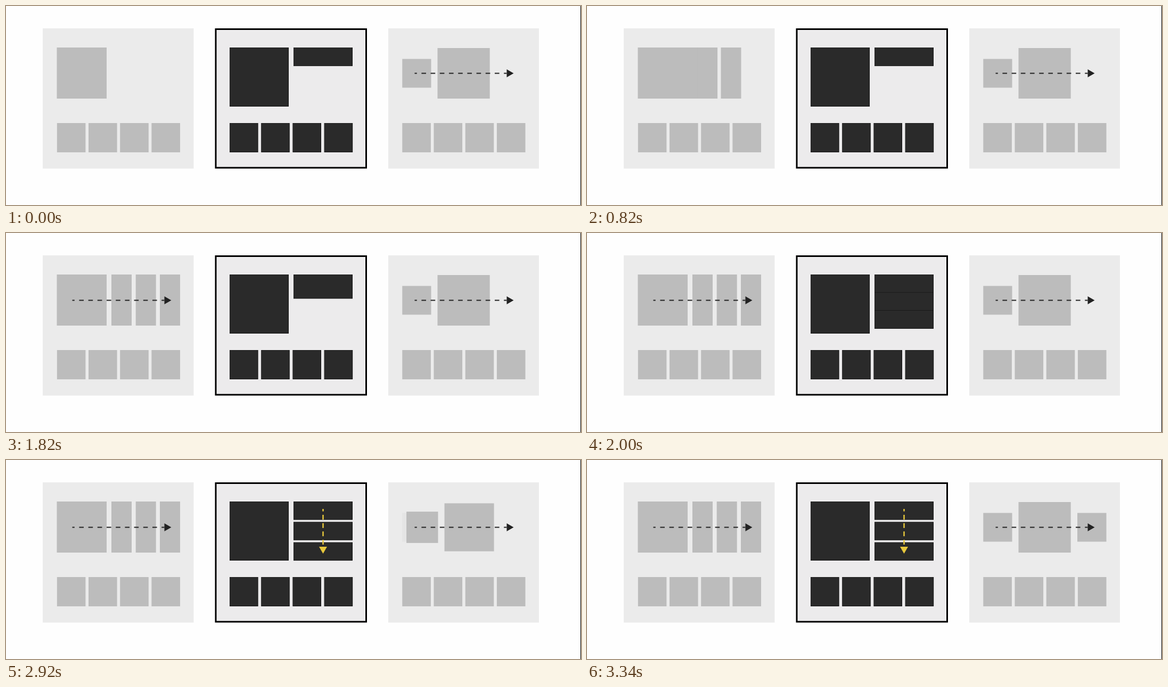
These frames come from a looping animation (1080 by 374 pixels, 3.68 s). An HTML page with a canvas:

```html
<!DOCTYPE html>
<html lang="en">
<head>
<meta charset="utf-8">
<title>Layout panels</title>
<style>
html, body { margin: 0; width: 100%; height: 100%; overflow: hidden; background: #fefefe; }
canvas { display: block; width: 1080px; height: 374px; }
</style>
</head>
<body>
<canvas id="stage" width="1080" height="374"></canvas>
<script>
const ctx = document.getElementById('stage').getContext('2d');
const LOOP = 3680;
const PANEL = '#ebebeb', GREY = '#bcbcbc', DARK = '#2a2a2a', EDGE = '#141414';
const INK = '#222', YELLOW = '#e8c83c';

const clamp = v => Math.min(1, Math.max(0, v));
const ramp = (t, start, length) => clamp((t - start) / length);
const easeOut = u => 1 - (1 - u) * (1 - u);
const mix = (a, b, p) => a + (b - a) * p;

function box(x, y, w, h, color) {
  ctx.fillStyle = color;
  ctx.fillRect(x, y, w, h);
}

// Edges go first so overlapping cards merge into one shape.
function darkCards(cards) {
  for (const [x, y, w, h] of cards) box(x, y, w, h, EDGE);
  for (const [x, y, w, h] of cards) box(x + 0.5, y + 0.5, w - 1.5, h - 1.5, DARK);
}

function row(x) {
  return [0, 1, 2, 3].map(i => [x + i * 59.2, 220, 53.6, 55]);
}

function greyRow(x) {
  for (const r of row(x)) box(...r, GREY);
}

function arrow(x, y, length, angle, color, width, dash, offset, alpha = 1) {
  if (alpha <= 0) return;
  ctx.save();
  ctx.globalAlpha = alpha;
  ctx.translate(x, y);
  ctx.rotate(angle);
  ctx.strokeStyle = ctx.fillStyle = color;
  ctx.lineWidth = width;
  ctx.setLineDash(dash);
  ctx.lineDashOffset = offset;
  ctx.beginPath();
  ctx.moveTo(0, 0);
  ctx.lineTo(length, 0);
  ctx.stroke();
  ctx.beginPath();
  ctx.moveTo(length, -7.5);
  ctx.lineTo(length + 13, 0);
  ctx.lineTo(length, 7.5);
  ctx.fill();
  ctx.restore();
}

function flatArrow(x, alpha) {
  arrow(x, 126.5, 173, 0, INK, 2, [8.6, 8.6], 4.3, alpha);
}

function leftPanel(t) {
  const p = easeOut(ramp(t, 660, 330));
  box(69, 42, 283.5, 263.5, PANEL);
  box(95.5, 78, 93.5, 96, GREY);
  if (p > 0) {
    for (const [from, to] of [[130, 198], [104, 243.7], [146, 289]]) {
      box(t >= 980 ? to : mix(from, to, p), 78, 38, 96, GREY);
    }
  }
  greyRow(95.8);
  flatArrow(124.5, ramp(t, 880, 100));
}

function middlePanel(t) {
  const p = easeOut(ramp(t, 1798, 310));
  box(392.5, 42, 285.5, 263.5, '#000');
  box(395.5, 45, 279.5, 257.5, '#ecebec');
  const bars = [0, 1, 2].map(i => [540, 78 + 38.3 * i * p, 111, 34.5]);
  darkCards([[420, 78, 111, 111], ...bars, ...row(420)]);
  arrow(595.5, 92, 71, Math.PI / 2, YELLOW, 2.5, [9, 6.6], 4.5, ramp(t, 2220, 120));
}

function rightPanel(t) {
  const p = easeOut(ramp(t, 2900, 345));
  const small = { x: 744.3, y: 99.5, w: 54.2, h: 54 };
  const large = { x: 810.5, y: 79, w: 98.2, h: 95 };
  const last = { x: 921, y: 99.5, w: 54.5, h: 54 };
  const card = (a, b) => box(
    mix(a.x, b.x, p), mix(a.y, b.y, p), mix(a.w, b.w, p), mix(a.h, b.h, p), GREY);

  box(718, 42, 283, 263.5, PANEL);
  ctx.globalAlpha = p;
  card(small, small);
  ctx.globalAlpha = 1;
  card(small, large);
  card(large, last);
  greyRow(744.3);
  flatArrow(767.5);
}

function draw(t) {
  box(0, 0, 1080, 374, '#fefefe');
  leftPanel(t);
  middlePanel(t);
  rightPanel(t);
  box(1079, 0, 1, 374, '#000');
}

const start = performance.now();
function tick() {
  draw((performance.now() - start) % LOOP);
  requestAnimationFrame(tick);
}
draw(0);
requestAnimationFrame(tick);
</script>
</body>
</html>
```
